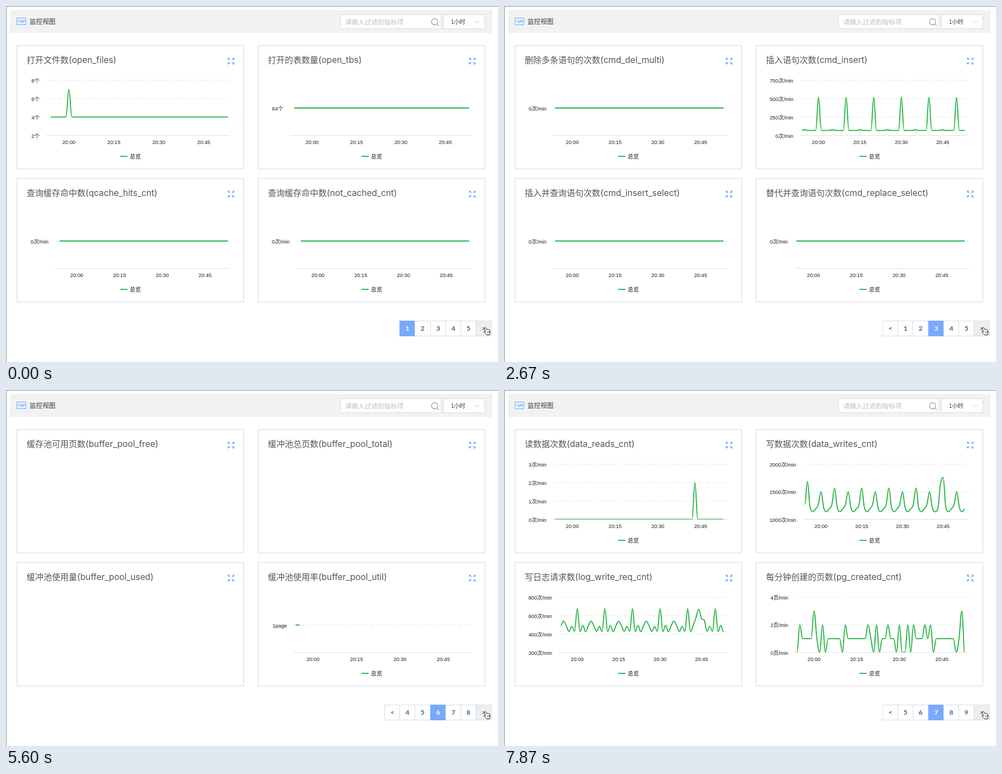
These frames come from a looping animation (879x637 px, 8 s). An HTML page:

```html
<!DOCTYPE html>
<html lang="zh-CN">
<head>
<meta charset="utf-8">
<title>监控视图</title>
<style>
  html, body { margin: 0; width: 100%; height: 100%; overflow: hidden; background: #fff; }
  svg { display: block; width: 879px; height: 637px; }
  text { font-family: "Liberation Sans", "Noto Sans CJK SC", "Noto Sans CJK", sans-serif; fill: #333; }
  .axis { font-size: 9.3px; fill: #1a1a1a; }
  .title { font: 15px Inter, "Noto Sans CJK SC", "Noto Sans CJK", sans-serif; fill: #555; }
  .metric { font-size: 15.4px; }
  .legend { font-size: 10px; font-weight: 500; fill: #111; }
  .pager { font: 700 12px Lato, sans-serif; fill: #2a6ba5; text-anchor: middle; }
  .mid { text-anchor: middle; }
  .end { text-anchor: end; }
  .line { fill: none; stroke: #1fb13c; stroke-width: 1.8; stroke-linejoin: round; }
</style>
</head>
<body>
<svg viewBox="0 0 879 637">
  <rect x="7" y="7" width="862" height="41.5" fill="#f2f2f2"/>
  <path d="M0 .5H879M.5 0V637" stroke="#8c8c8c"/>
  <g fill="none" stroke="#79a9fb">
    <rect x="19.5" y="21.5" width="16" height="12" fill="#eaf2ff"/>
    <path d="M21 27.5h2l2-2.5 2.5 5 2-4 1.5 2.5 1.5-2.5 1.5 1.5" stroke-width="1.2"/>
  </g>
  <text x="42" y="31.5" font-size="11.6">监控视图</text>
  <g fill="#fff" stroke="#dcdcdc">
    <rect x="597.5" y="15.5" width="180" height="25"/>
    <rect x="781.5" y="15.5" width="74" height="25"/>
  </g>
  <text x="606" y="32.5" font-size="11.6" style="fill:#bdbdbd">请输入过滤的指标项</text>
  <g fill="none" stroke="#999" stroke-width="1.2">
    <circle cx="765.8" cy="28.3" r="5.6"/><path d="M769.8 32.3l3.5 3.5"/>
    <path d="M837 26l4.5 4.5 4.5-4.5" stroke="#c4c4c4" stroke-width="1"/>
  </g>
  <text x="795" y="31.5" font-size="10">1小时</text>
  <g id="cards"></g>
  <g id="titles"></g>
  <g id="charts"></g>
  <g id="pager"></g>
  <path d="M855.5 575.3c1-.6 1.8 0 2.2.9l1.3 3 .8-.7 1.1.7.9-.5 1.1.8 1 .2c1 1.7 1.3 3.2 1 4.8l-.6 1.8.2 1.8-5 .8-.8-1.5c-1.7-.7-3.2-2-4.7-3.8-.6-1 .4-1.7 1.4-1.2l1.3.8-1.7-5.2c-.3-.8-.1-1.5.5-1.9z"
        fill="#fff" stroke="#222"/>
  <path d="M859.5 582.5l.8 3M861.5 582l.6 3M863.3 581.8l.4 3" stroke="#222" stroke-width=".7"/>
</svg>
<script>
const TOP = 133, BOTTOM = 231.5, RIGHT = 400, STEP = 0.01633;
const COUNT = 60, FRAME = 1000 / 15, LOOP = 8000;
const $ = id => document.getElementById(id);

// One value per minute: a rule, with a few key minutes set apart.
const series = (rule, keys = {}) => Array.from({ length: COUNT }, (_, i) => keys[i] ?? rule(i));
const noise = i => {
  const n = Math.sin((i + 1) * 12.9898) * 43758.5453;
  return (n - Math.floor(n)) * 2 - 1;
};

// Load spikes shared by the query and update counters.
const burst = { 25: 1, 26: -0.75, 28: 1, 32: -0.3, 33: 0.25, 46: -0.9, 47: -0.8, 48: 1.83 };
const bursting = (base, size, ripple) => i => base + (i in burst ? size * burst[i] : ripple * noise(i));

const openFiles = series(i => i === 6 ? 7 : 4);
const queries = series(bursting(21.8, 7, 0.45), { 6: 23.4, 50: 24.5, 56: 24.5, 59: 25.7 });
const updates = series(bursting(1.91, 0.76, 0.06));
const deletes = series(i => i < 48 ? (i % 5 === 1 ? 36 : 34) : i % 2 ? 32 - (i - 48) * 0.2 : 39, { 59: 42 });
const inserts = series(i => i % 10 === 6 ? 518 : i % 10 === 1 ? 78 : 68);
const selects = series(i => i % 10 === 6 ? 3.04 : i % 10 === 1 ? 2.83 : 2.73 + 0.04 * noise(i),
  { 49: 3.1, 50: 3.66, 51: 3.2, 52: 2.93, 56: 3.4, 59: 4.15 });
const reads = series(i => i === 49 ? 2 : 0);
const writes = series(i => i % 10 === 6 ? 1500 : [1270, 1570, 1210, 1140, 1190][i % 5], { 1: 1690, 50: 1640, 51: 1760 });
const logs = series(i => [490, 540, 490, 430, 482, 430, 675, 427, 495, 425][i % 10], { 49: 580, 50: 670, 51: 570, 52: 550 });
const highs = [1, 9, 17, 25, 28, 32, 36, 39, 41, 45, 47], lows = [0, 8, 10, 16, 27, 29, 35, 37, 38, 40, 48, 56, 59];
const pagesMade = series(i => highs.includes(i) ? 2 : lows.includes(i) ? 0 : 1, { 6: 3, 58: 3 });

const RATE = "次/min";
const flat = (name, left = 88, value = 0, unit = RATE) => ({ name, left, unit, ticks: [value] });
// scale converts series values to the unit of the ticks
const plot = (name, left, unit, ticks, values, scale = 1) => ({ name, left, unit, ticks, values, scale });
const all = t => [t, t, t, t];

// click: pager moves on; swap: new titles; starts: each chart begins to draw
const pages = [
  { click: 0, swap: 0, starts: all(-2000), charts: [
    plot("打开文件数(open_files)", 72, "个", [8, 6, 4, 2], openFiles),
    flat("打开的表数量(open_tbs)", 76, 64, "个"),
    flat("查询缓存命中数(qcache_hits_cnt)"), flat("查询缓存命中数(not_cached_cnt)")] },
  { click: 265, swap: 265, starts: all(285), charts: [
    plot("查询次数(queries_cnt)", 108, RATE, [40000, 30000, 20000, 10000], queries, 1000),
    plot("执行语句次数(questions_cnt)", 108, RATE, [40000, 30000, 20000, 10000], queries, 1000),
    flat("慢查询次数(slow_queries_cnt)"),
    plot("执行删除的次数(cmd_delete)", 93, RATE, [50, 40, 30, 20], deletes)] },
  { click: 1598, swap: 1645, starts: all(1690), charts: [
    flat("删除多条语句的次数(cmd_del_multi)"),
    plot("插入语句次数(cmd_insert)", 98, RATE, [750, 500, 250, 0], inserts),
    flat("插入并查询语句次数(cmd_insert_select)"), flat("替代并查询语句次数(cmd_replace_select)")] },
  { click: 2998, swap: 2998, starts: all(3030), charts: [
    plot("查询语句次数(cmd_select)", 103, RATE, [5000, 4000, 3000, 2000], selects, 1000),
    plot("更新语句次数(cmd_update)", 103, RATE, [4000, 3000, 2000, 1000], updates, 1000),
    flat("更新多条语句次数(cmd_update_multi)"), flat("锁表语句次数(cmd_lock_tbs)")] },
  { click: 4265, swap: 4326, starts: all(4373), charts: [
    flat("删库语句次数(cmd_drop_db)"), flat("删表语句次数(cmd_drop_tb)"),
    flat("建库语句次数(cmd_create_db)"), flat("建表语句次数(cmd_create_tb)")] },
  { click: 5530, swap: 5530, starts: [5664, 5638, 5668, 5567], charts: [
    flat("缓存池可用页数(buffer_pool_free)", 83, 1, "page"), flat("缓冲池总页数(buffer_pool_total)", 97, 8192, "page"),
    flat("缓冲池使用量(buffer_pool_used)", 98, 8191, "page"), flat("缓冲池使用率(buffer_pool_util)", 83, 1, "page")] },
  { click: 6798, swap: 6798, starts: all(6837), charts: [
    plot("读数据次数(data_reads_cnt)", 88, RATE, [3, 2, 1, 0], reads),
    plot("写数据次数(data_writes_cnt)", 103, RATE, [2000, 1500, 1000], writes),
    plot("写日志请求数(log_write_req_cnt)", 98, RATE, [800, 600, 400, 200], logs),
    plot("每分钟创建的页数(pg_created_cnt)", 89, "页/min", [4, 2, 0], pagesMade)] }
];

const place = i => `transform="translate(${431 * (i % 2)} ${238 * (i >> 1)})"`;

// Cubic path with level tangents at peaks and dips.
function smoothPath(points) {
  const slope = points.map(([, y], i) => {
    if (!i || i === points.length - 1) return 0;
    const before = y - points[i - 1][1], after = points[i + 1][1] - y;
    if (before * after <= 0) return 0;
    const limit = 2.4 * Math.min(Math.abs(before), Math.abs(after));
    return Math.sign(after) * Math.min(Math.abs(before + after) / 2, limit);
  });
  return points.map(([x, y], i) => {
    if (!i) return `M${x} ${y}`;
    const [px, py] = points[i - 1], k = 0.4, dx = (x - px) * k;
    return `C${px + dx} ${py + slope[i - 1] * k} ${x - dx} ${y - slope[i] * k} ${x} ${y}`;
  }).join("");
}

function chartMarkup(chart, page, i) {
  const { left, ticks, unit, values, scale } = chart, width = RIGHT - left;
  const first = page ? 0.011 : 0.025, hi = ticks[0], lo = ticks[ticks.length - 1];
  const x = minute => left + width * (first + minute * STEP);
  const y = v => hi === lo ? 182.5 : BOTTOM - (BOTTOM - TOP) * (v - lo) / (hi - lo);
  const rows = ticks.map(v => {
    const grid = y(v) < BOTTOM ? `<path d="M${left} ${y(v)}H${RIGHT}" stroke="#e9e9e9" stroke-dasharray="7 3.5"/>` : "";
    return `${grid}<text class="axis end" x="${left - 12}" y="${y(v) + 4.2}">${v}${unit}</text>`;
  }).join("");
  const times = ["20:00", "20:15", "20:30", "20:45"].map((label, k) =>
    `<text class="axis mid" x="${x(6 + 15 * k)}" y="247.3">${label}</text>`).join("");
  const path = values ? smoothPath(values.map((v, m) => [x(m), y(v * scale)])) : `M${x(0)} 182.5H${x(COUNT - 1)}`;
  const clip = `clip${page}-${i}`;
  return `<g ${place(i)}>${rows}${times}
    <path d="M${left} ${BOTTOM}H${RIGHT}" stroke="#e0e0e0"/>
    <clipPath id="${clip}"><rect x="${left}" y="120" width="0" height="${BOTTOM - 120}"/></clipPath>
    <path class="line" d="${path}" clip-path="url(#${clip})"/>
    <path class="line" d="M204 269H217"/><text class="legend" x="221" y="272.7">总览</text></g>`;
}

function titleMarkup({ name }, i) {
  const [label, metric] = name.split("(");
  return `<text class="title" ${place(i)} x="37" y="102.3">${label}<tspan class="metric">(${metric}</tspan></text>`;
}

const arrow = angle => `<path transform="translate(402 98.5) rotate(${angle})"
  d="M6-5.8V-1.8L4.6-3.2 2.6-1.2 1.4-2.4 3.4-4.4 2-5.8Z" fill="#79a9fb"/>`;
const card = i => `<g ${place(i)}><rect x="19.5" y="70.5" width="405" height="221" fill="#fff" stroke="#d9d9d9"/>
  ${[0, 90, 180, 270].map(arrow).join("")}</g>`;

function pagerMarkup(current) {
  const first = current < 5 ? 1 : current - 2, edge = slot => Math.round(676.6 + 27.3 * slot) - 0.5;
  let out = "";
  for (let slot = current > 1 ? 0 : 1; slot < 7; slot++) {
    const number = first + slot - 1, active = slot > 0 && slot < 6 && number === current;
    const label = slot === 0 ? "&lt;" : slot === 6 ? "&gt;" : number;
    const fill = active ? "#79a9fb" : slot === 6 ? "#eee" : "#fff";
    out += `<rect x="${edge(slot)}" y="563.5" width="${edge(slot + 1) - edge(slot)}" height="27" fill="${fill}" stroke="${active ? fill : "#ddd"}"/>
      <text class="pager" x="${edge(slot) + 13.7}" y="580.7" ${active ? 'style="fill:#fff"' : ""}>${label}</text>`;
  }
  return out;
}

const group = (items, render) => items.map((item, i) => `<g>${render(item, i)}</g>`).join("");
$("cards").innerHTML = [0, 1, 2, 3].map(card).join("");
$("titles").innerHTML = group(pages, p => p.charts.map(titleMarkup).join(""));
$("charts").innerHTML = group(pages, (p, n) => p.charts.map((c, i) => chartMarkup(c, n, i)).join(""));
$("pager").innerHTML = group(pages, (p, n) => pagerMarkup(n + 1));

const show = (el, on) => el.style.display = on ? "" : "none";
const latest = (key, t) => pages.filter(p => t >= p[key]).length - 1;

function draw(now) {
  const t = Math.floor((now % LOOP + 4) / FRAME) * FRAME;
  const clicked = latest("click", t), swapped = latest("swap", t);
  pages.forEach((page, n) => {
    show($("pager").children[n], n === clicked);
    show($("titles").children[n], n === swapped);
    show($("charts").children[n], n === swapped);
  });
  [...$("charts").children[swapped].children].forEach((el, i) => {
    const progress = (t - pages[swapped].starts[i]) / 1000;
    show(el, progress >= 0);
    const width = RIGHT - pages[swapped].charts[i].left;
    el.querySelector("rect").setAttribute("width", width * Math.max(0, Math.min(1, progress)));
  });
}

const began = performance.now();
function tick() {
  draw(performance.now() - began);
  requestAnimationFrame(tick);
}
tick();
</script>
</body>
</html>
```
